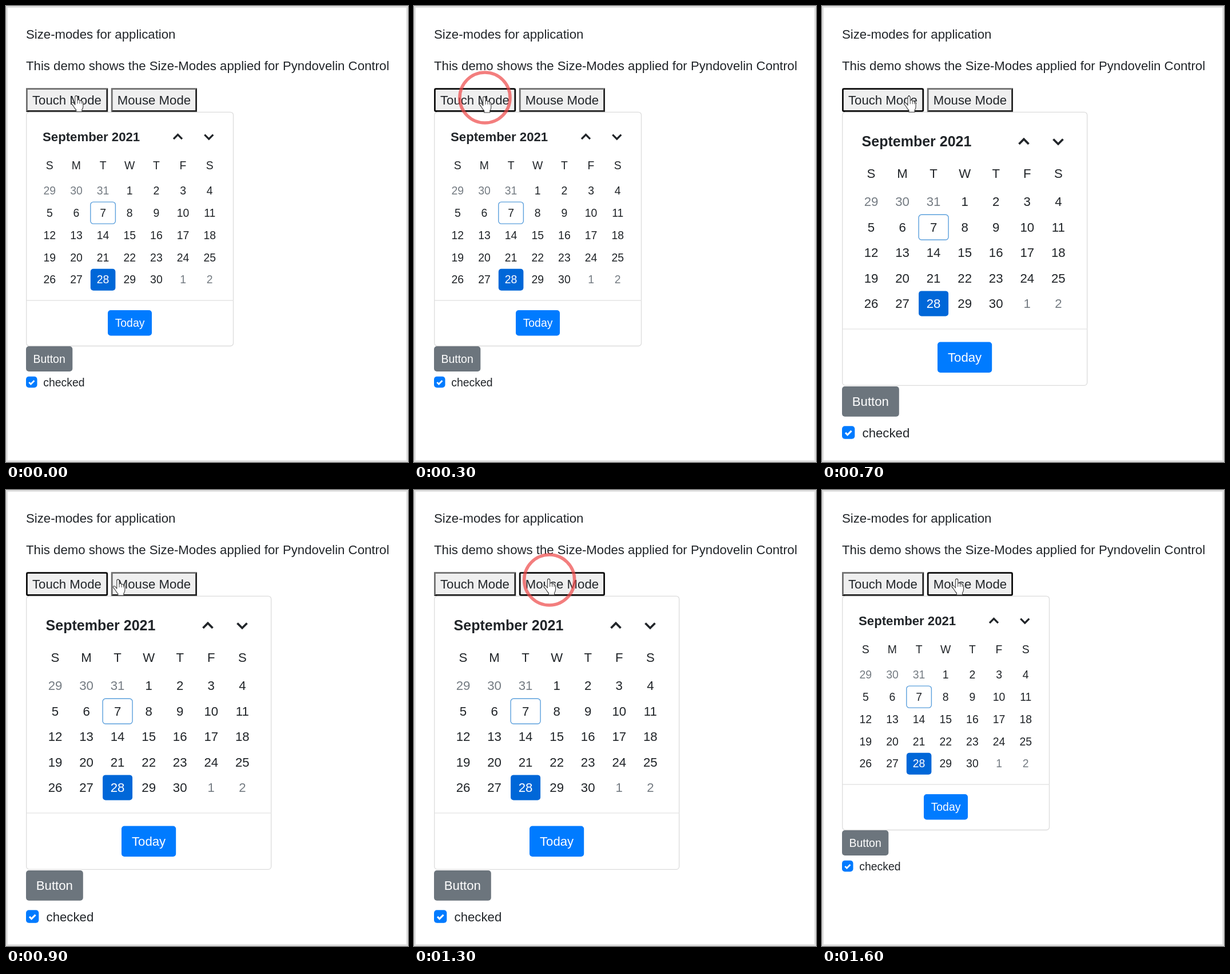
Write an HTML page that moves like this. It is 703 px wide and 796 px high and loops after 1.7 s.

```html
<!DOCTYPE html>
<html lang="en">
<head>
<meta charset="utf-8">
<title>Size modes</title>
<style>
  html, body { margin: 0; width: 100%; height: 100%; overflow: hidden; background: #fff; }
  svg { display: block; width: 703px; height: 796px; }
  text { font-family: "Liberation Sans", Arial, sans-serif; fill: #212529; }
  .mid { text-anchor: middle; }
  .dim { fill: #757c83; }
  .lit { fill: #fff; }
  .bold { font-weight: 700; }
</style>
</head>
<body>
<svg id="stage" viewBox="0 0 703 796" xmlns="http://www.w3.org/2000/svg"></svg>
<script>
const NS = "http://www.w3.org/2000/svg";
const LOOP = 1700, STEP = 100;
const stage = document.getElementById("stage");

function add(parent, tag, attrs, content) {
  const el = document.createElementNS(NS, tag);
  for (const k in attrs) el.setAttribute(k, attrs[k]);
  if (content !== undefined) el.textContent = content;
  parent.appendChild(el);
  return el;
}

const group = parent => add(parent, "g", {});
const show = (el, on) => el.setAttribute("visibility", on ? "visible" : "hidden");

function box(parent, x, y, width, height, rx, fill, extra) {
  return add(parent, "rect", { x, y, width, height, rx, fill, ...extra });
}

// cy is the middle of the capital letters
function label(parent, str, x, cy, size, cls = "") {
  return add(parent, "text", { x, y: cy + size * 0.344, "font-size": size, class: cls }, str);
}

function modeButton(str, x, width) {
  const y = 143.3, h = 41.6, b = 2.8;
  box(stage, x, y, width, h, 0, "#efefef");
  const idle = group(stage);
  const r = x + width, low = y + h;
  add(idle, "path", {
    fill: "#6f6f6f",
    d: `M${x} ${low}V${y}H${r}l${-b} ${b}H${x + b}V${low - b}Z`
  });
  add(idle, "path", {
    fill: "#222",
    d: `M${r} ${y}V${low}H${x}l${b} ${-b}H${r - b}V${y + b}Z`
  });
  const focus = group(stage);
  box(focus, x + b / 2, y + b / 2, width - b, h - b, 2, "#efefef",
    { stroke: "#0c0c0c", "stroke-width": b });
  label(stage, str, x + 11, 164.4, 22.2);
  return on => { show(idle, !on); show(focus, on); };
}

function chevron(parent, x, y, w, dir) {
  const h = w * 0.25 * dir;
  add(parent, "path", {
    d: `M${x - w / 2} ${y + h}L${x} ${y - h}L${x + w / 2} ${y + h}`,
    fill: "none", stroke: "#212529", "stroke-width": w * 0.22
  });
}

function panel(p) {
  const g = group(stage), f = p.font;
  const colX = c => p.col + c * p.dx;
  const rowY = r => p.row + r * p.dy;

  box(g, 35.7, 185.3, p.w, p.h, 5, "#fff", { stroke: "#dcdcdc", "stroke-width": 1.3 });
  label(g, "September 2021", p.titleX, p.titleY, p.titleSize, "bold");
  chevron(g, p.up, p.titleY + 0.3, p.arrow, 1);
  chevron(g, p.down, p.titleY + 0.3, p.arrow, -1);

  [..."SMTWTFS"].forEach((d, c) => label(g, d, colX(c), p.head, f, "mid"));

  const cell = (c, r, fill, extra) =>
    box(g, colX(c) - p.cw / 2, rowY(r) - p.ch / 2, p.cw, p.ch, 5, fill, extra);
  cell(2, 1, "#fff", { stroke: "#5b9fdc", "stroke-width": 1.4 });
  cell(2, 4, "#0067d8");

  for (let i = 0; i < 35; i++) {
    const day = i < 3 ? 29 + i : (i - 3) % 30 + 1;
    const cls = i === 30 ? "lit" : i < 3 || i > 32 ? "dim" : "";
    label(g, day, colX(i % 7), rowY(Math.floor(i / 7)), f, "mid " + cls);
  }

  add(g, "path", { d: `M36 ${p.rule}h${p.w}`, stroke: "#e4e4e4", "stroke-width": 1.3 });

  const push = (str, [x, y, w, h], fill) => {
    box(g, x, y, w, h, 5, fill);
    label(g, str, x + w / 2, y + h / 2 + 0.3, f, "mid lit");
  };
  push("Today", p.today, "#007bff");
  push("Button", p.button, "#6c757d");

  const s = p.tick, y = p.tickY;
  box(g, 35, y - s / 2, s, s, 5, "#007bff");
  add(g, "path", {
    d: `M${35 + s * 0.27} ${y + s * 0.02}l${s * 0.16} ${s * 0.16}l${s * 0.31} ${-s * 0.31}`,
    fill: "none", stroke: "#fff", "stroke-width": s * 0.14
  });
  label(g, "checked", p.checkX, y + 0.4, f);
  return g;
}

box(stage, 0, 0, 703, 796, 0, "#fff");
box(stage, 1.4, 1.4, 700.2, 793.2, 0, "none", { stroke: "#dcdcdc", "stroke-width": 2.8 });
label(stage, "Size-modes for application", 35, 49, 22.2);
label(stage, "This demo shows the Size-Modes applied for Pyndovelin Control", 35, 104.3, 22.2);

const touchFocus = modeButton("Touch Mode", 35, 143.2);
const mouseFocus = modeButton("Mouse Mode", 183.8, 150.2);

const compact = panel({
  w: 361.8, h: 408.2, font: 19.4,
  titleX: 64, titleY: 228, titleSize: 22.2, up: 300.5, down: 354.8, arrow: 15,
  col: 76.3, dx: 46.65, head: 278, row: 322.3, dy: 38.85, cw: 43.6, ch: 38,
  rule: 514, today: [178, 531, 77, 44.5], button: [35, 594, 81.3, 44],
  tick: 19.5, tickY: 656.5, checkX: 65.3
});
const roomy = panel({
  w: 428, h: 477, font: 22.2,
  titleX: 69.6, titleY: 236.4, titleSize: 25, up: 353, down: 413, arrow: 17,
  col: 86, dx: 54.55, head: 292, row: 341.8, dy: 44.4, cw: 52, ch: 44,
  rule: 563.8, today: [202, 586.6, 95.2, 53.4], button: [35, 664, 99.8, 52.8],
  tick: 22.3, tickY: 744.5, checkX: 70.6
});

const ring = add(stage, "circle", { fill: "none", stroke: "#ee4848", "stroke-opacity": 0.7 });

const hand = group(stage);
add(hand, "path", {
  d: "M7.5 17V3.2a2.1 2.1 0 0 1 4.2 0V9q.4-1 2-.9q1.8.1 2 1.8q.5-.7 1.8-.5q1.6.3 1.7 1.9" +
     "q2.2-.3 2.3 2.2V20q0 3-2 5.5V29H9.5V26Q7 23.5 5 20Q3.5 17.5 1.5 15.5Q.3 13.8 1.8 12.9" +
     "Q3.6 12 5.5 14.5Z",
  fill: "#fff", stroke: "#3c3c3c", "stroke-width": 1.1, "stroke-linejoin": "round"
});
add(hand, "path", {
  d: "M11.7 9v6M15.7 10v5M19.2 11.5v3.5",
  fill: "none", stroke: "#3c3c3c", "stroke-width": 1
});

// Each press holds a full ring, then shrinks for one step
const presses = [
  { from: 200, release: 400 },
  { from: 1300, release: 1500 }
];

function draw(t) {
  const u = Math.min(1, Math.max(0, (t - 450) / 750));
  const glide = u * u * (3 - 2 * u);
  const x = 124 + 112.7 * glide;
  const y = 160 - 3 * glide;
  const lift = t < 100 ? 1.5 : 0;
  hand.setAttribute("transform", `translate(${x - 10.7} ${y - 3 - lift})`);

  const press = presses.find(p => t >= p.from && t < p.release + STEP);
  show(ring, !!press);
  if (press) {
    const held = t < press.release;
    ring.setAttribute("cx", x);
    ring.setAttribute("cy", y);
    ring.setAttribute("r", held ? 44 : 15);
    ring.setAttribute("stroke-width", held ? 5.6 : 2);
  }

  const large = t >= 400 && t < 1400;
  show(roomy, large);
  show(compact, !large);
  touchFocus(t >= 200 && t < 1300);
  mouseFocus(t >= 1300);
}

const start = performance.now();
function tick() {
  const t = (performance.now() - start) % LOOP;
  draw(Math.floor(t / STEP) * STEP);
  requestAnimationFrame(tick);
}
tick();
</script>
</body>
</html>
```
